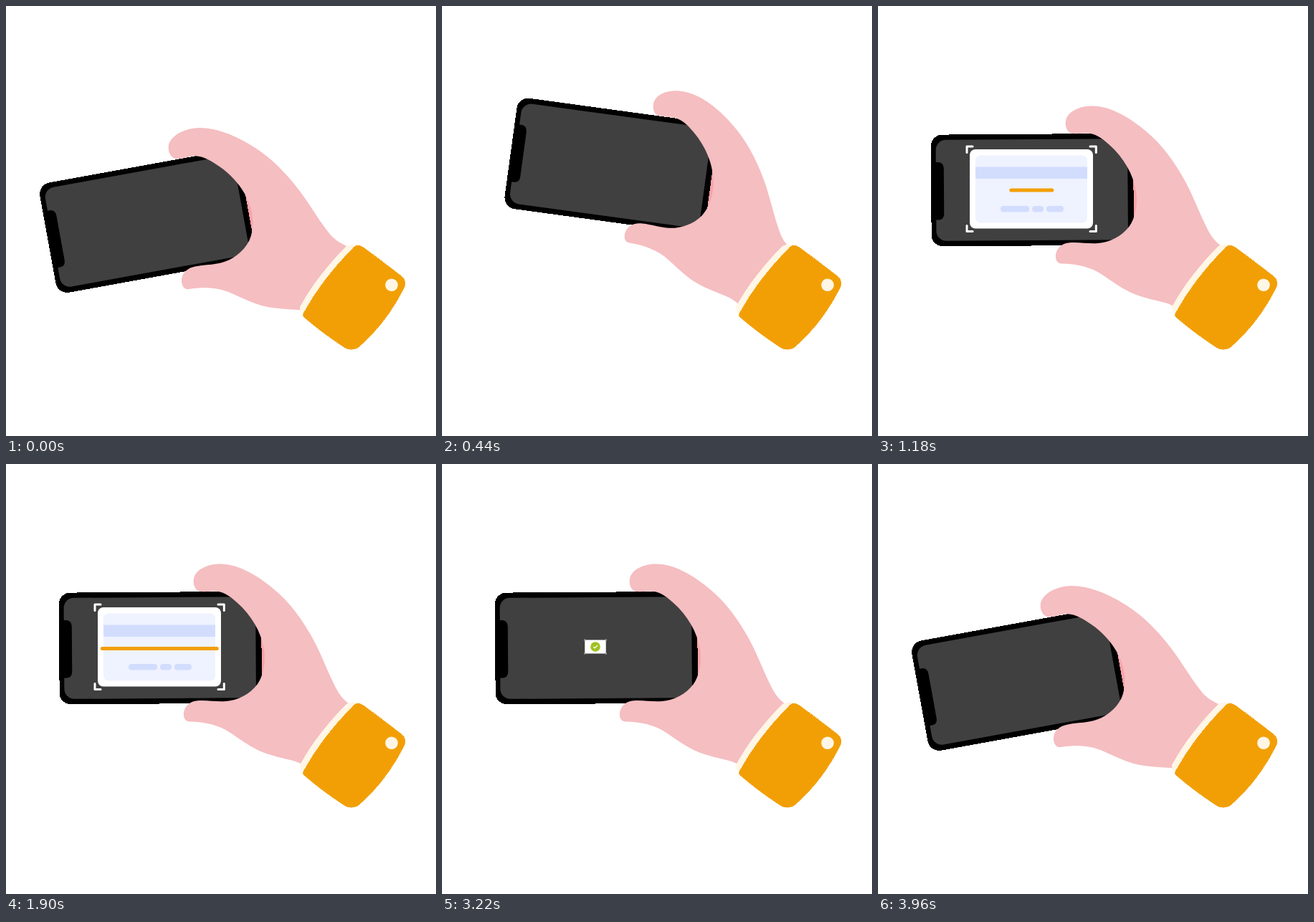
An HTML page for the animation above (4.8 s loop, 600 by 600 pixels).

```html
<!DOCTYPE html>
<html lang="en">
<head>
<meta charset="utf-8">
<title>Phone scan</title>
<style>
html, body { margin: 0; width: 100%; height: 100%; overflow: hidden; background: #fff; }
svg { display: block; width: 100vw; height: 100vh; }
.crisp { shape-rendering: crispEdges; }
</style>
</head>
<body>
<svg viewBox="0 0 600 600">
  <g id="arm">
    <rect x="335" y="215" width="29" height="95" fill="#fba3aa"/>
    <g transform="rotate(-.4 215 256)">
      <rect class="crisp" x="74.200" y="178.700" width="282.300" height="155.800" rx="16"/>
      <rect x="81" y="186" width="267.500" height="141" rx="14" fill="#404040"/>
      <path d="M80 217H85Q92 218 92 226V289Q92 297 85 297.500H80Z"/>
    </g>
    <g id="view">
      <rect x="128" y="200" width="172" height="110.500" rx="8" fill="#fff"/>
      <g id="info">
        <rect x="136" y="208.500" width="156" height="94" rx="7" fill="#eff2ff"/>
        <g fill="#d2ddfe">
          <rect x="136" y="224.500" width="156" height="16.500"/>
          <rect x="171" y="279" width="40" height="8.500" rx="4"/>
          <rect x="215" y="279" width="16" height="8.500" rx="4"/>
          <rect x="235" y="279" width="24" height="8.500" rx="4"/>
        </g>
      </g>
      <path id="beam" fill="none" stroke="#f29f05" stroke-width="5" stroke-linecap="round"/>
      <g id="done">
        <circle cx="214" cy="255" r="40" fill="#a0c123"/>
        <path d="M201 258L209 266L229 246" fill="none" stroke="#fff" stroke-width="8" stroke-linecap="round" stroke-linejoin="round"/>
      </g>
      <path id="marks" d="M124 204.500V196H132M296 196H304.300V204.500M304.300 306.500V314.500H296M132 314.500H124V306.500" fill="none" stroke="#fff" stroke-width="3" stroke-linecap="round" stroke-linejoin="round"/>
    </g>
    <path fill="#f5bec1" d="M272 178C263 177 260 166 262.500 158C266 147 281 139.500 299 139.500C325 139.500 355 157 381 181C403 201 421 229 433 253C443 273 453 300 464 319C469 327 475 332 483 338L500 380L440 440L424 426C417 421 412 418 404 415C390 411 371 408 352 399.500C337 392 325 383 313 375C297 364 278 360 256 359.500C249 359 247.500 353 248 347C249.500 337 257 330.500 270 330C283 329.500 294 332 307 331C322 330 340 322 351 307C360 294 362 275 360.500 262C358 240 346 214 322 193C311 183 302 177.500 291 177.500C284 177.500 279 178.500 272 178Z"/>
  </g>
  <path fill="#fff6e6" d="M475 335C449 361 427 389 410 420Q409 424 415 430L440 420L492 335Q484 330 475 335Z"/>
  <path class="crisp" fill="#f29f05" stroke="#f29f05" stroke-width=".5" d="M493 334Q488 333 484 338C456 366 433 396 415 429Q413 433 418 436C433 449 452 463 470 475Q481 483 492 476C519 453 541 423 556 392Q559 383 552 377C534 363 515 349 499 337Q496 335 493 334Z"/>
  <circle cx="538" cy="389.300" r="8.800" fill="#fff6e6"/>
</svg>
<script>
const LOOP = 4800;
const $ = id => document.getElementById(id);
const arm = $('arm'), view = $('view'), info = $('info');
const beam = $('beam'), done = $('done'), marks = $('marks');

// Eased value through [time, value] keys, held outside them.
function track(t, ...keys) {
  if (t <= keys[0][0]) return keys[0][1];
  for (let i = 1; i < keys.length; i++) {
    const [t0, a] = keys[i - 1], [t1, b] = keys[i];
    if (t < t1) {
      const p = (t - t0) / (t1 - t0);
      return a + (b - a) * p * p * (3 - 2 * p);
    }
  }
  return keys[keys.length - 1][1];
}

function scale(el, k) {
  el.setAttribute('visibility', k > 0.001 ? 'inherit' : 'hidden');
  el.setAttribute('transform', `translate(214 255) scale(${k}) translate(-214 -255)`);
}

function draw(t) {
  const turn = track(t, [0, -9.9], [300, 15], [600, 0], [3360, 0], [3660, 10], [3960, -9.9]);
  arm.setAttribute('transform', `rotate(${turn} 461 383)`);

  scale(view, track(t, [600, 0], [900, 1], [3000, 1], [3300, 0]));
  marks.setAttribute('opacity', track(t, [860, 0], [1160, 1]));
  info.setAttribute('opacity', track(t, [2060, 1], [2160, 0]));

  const half = track(t, [1060, 0], [1360, 80], [2060, 80], [2360, 0]);
  const y = track(t, [1360, 257], [1740, 212.5], [2060, 301.5], [2360, 257]);
  beam.setAttribute('d', half > 0 ? `M${214.3 - half} ${y}H${214.3 + half}` : '');

  scale(done, track(t, [2360, 0], [2600, 1.1], [2700, 1]));
}

const start = performance.now();
function tick() {
  draw((performance.now() - start) % LOOP);
  requestAnimationFrame(tick);
}
draw(0);
requestAnimationFrame(tick);
</script>
</body>
</html>
```
